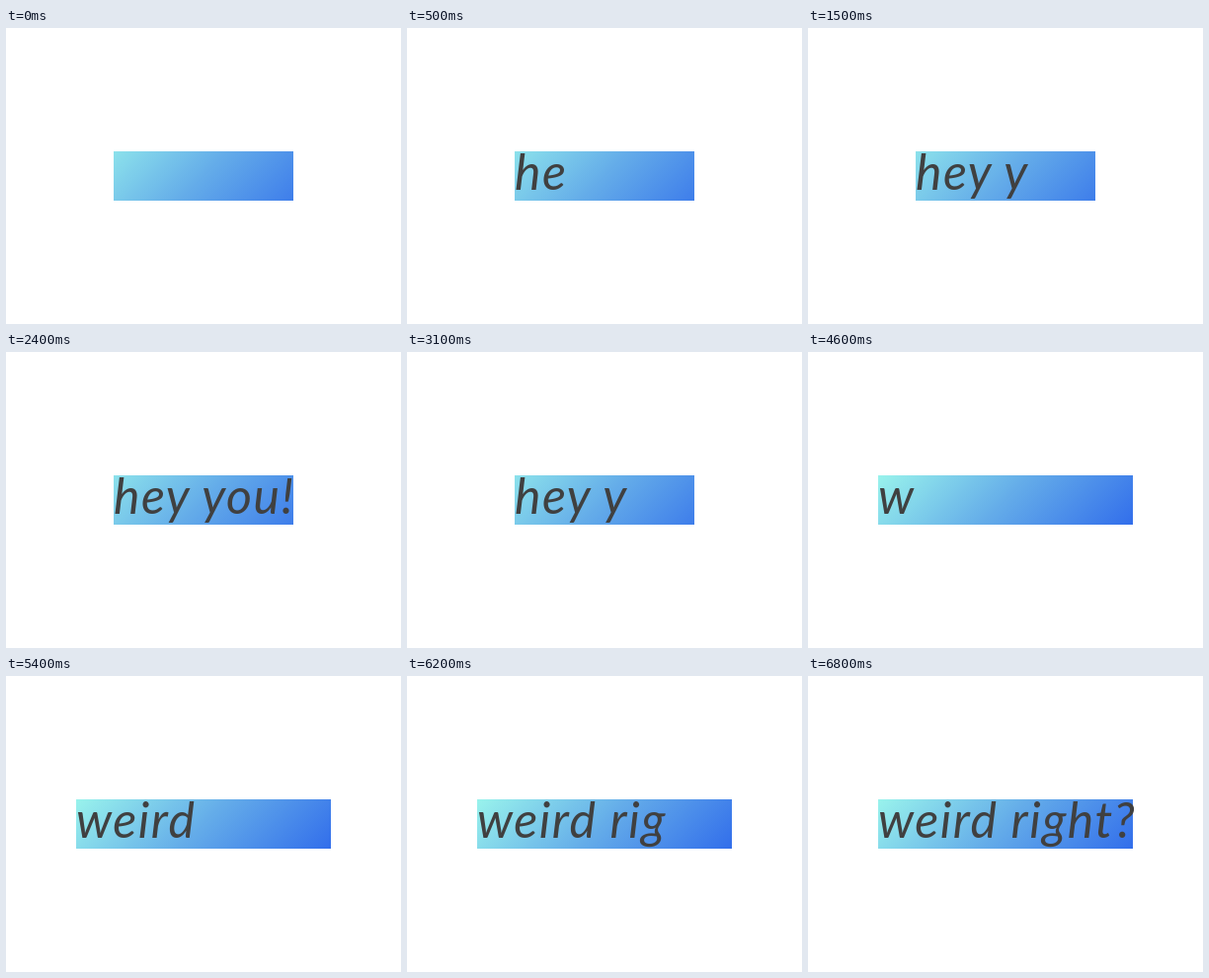
Animation of 400 by 300 pixels, one loop 10000 ms. Source, as an HTML page:

```html
<!DOCTYPE html>
<html lang="en">
<head>
<meta charset="utf-8">
<title>Typing text</title>
<style>
  html, body { margin: 0; width: 100%; height: 100%; overflow: hidden; background: #fff; }
  svg { display: block; width: 400px; height: 300px; }
  text { font: italic 50px Lato, sans-serif; letter-spacing: 1.5px; fill: #404040; white-space: pre; }
</style>
</head>
<body>
<svg viewBox="0 0 400 300">
  <linearGradient id="sky" gradientUnits="userSpaceOnUse" x1="123" y1="73" x2="277" y2="227">
    <stop offset="0" stop-color="#99f3ec"/>
    <stop offset=".5" stop-color="#64ace9"/>
    <stop offset="1" stop-color="#326eeb"/>
  </linearGradient>
  <rect id="box" y="125" height="50" fill="url(#sky)"/>
  <text id="label" y="164"></text>
</svg>
<script>
  const LOOP = 10000;
  const box = document.getElementById('box');
  const label = document.getElementById('label');
  const first = { text: 'hey you!', x: 109, width: 182 };
  const second = { text: 'weird right?', x: 71, width: 258 };

  // Times at which one more letter appears or disappears.
  const typeFirst = [200, 500, 800, 1100, 1500, 1800, 2100, 2400];
  const eraseFirst = [2700, 2900, 3100, 3400, 3600, 3900, 4100, 4300];
  const secondStart = 4600, secondStep = 200;

  const passed = (times, t) => times.filter(time => time <= t).length;

  function draw(now) {
    const t = now % LOOP;
    const line = t < secondStart ? first : second;
    const count = line === first
      ? passed(typeFirst, t) - passed(eraseFirst, t)
      : Math.floor((t - secondStart) / secondStep) + 1;
    box.setAttribute('x', line.x);
    box.setAttribute('width', line.width);
    label.setAttribute('x', line.x);
    label.textContent = line.text.slice(0, count);
  }

  const start = performance.now();
  function tick() {
    draw(performance.now() - start);
    requestAnimationFrame(tick);
  }
  draw(0);
  requestAnimationFrame(tick);
</script>
</body>
</html>
```
